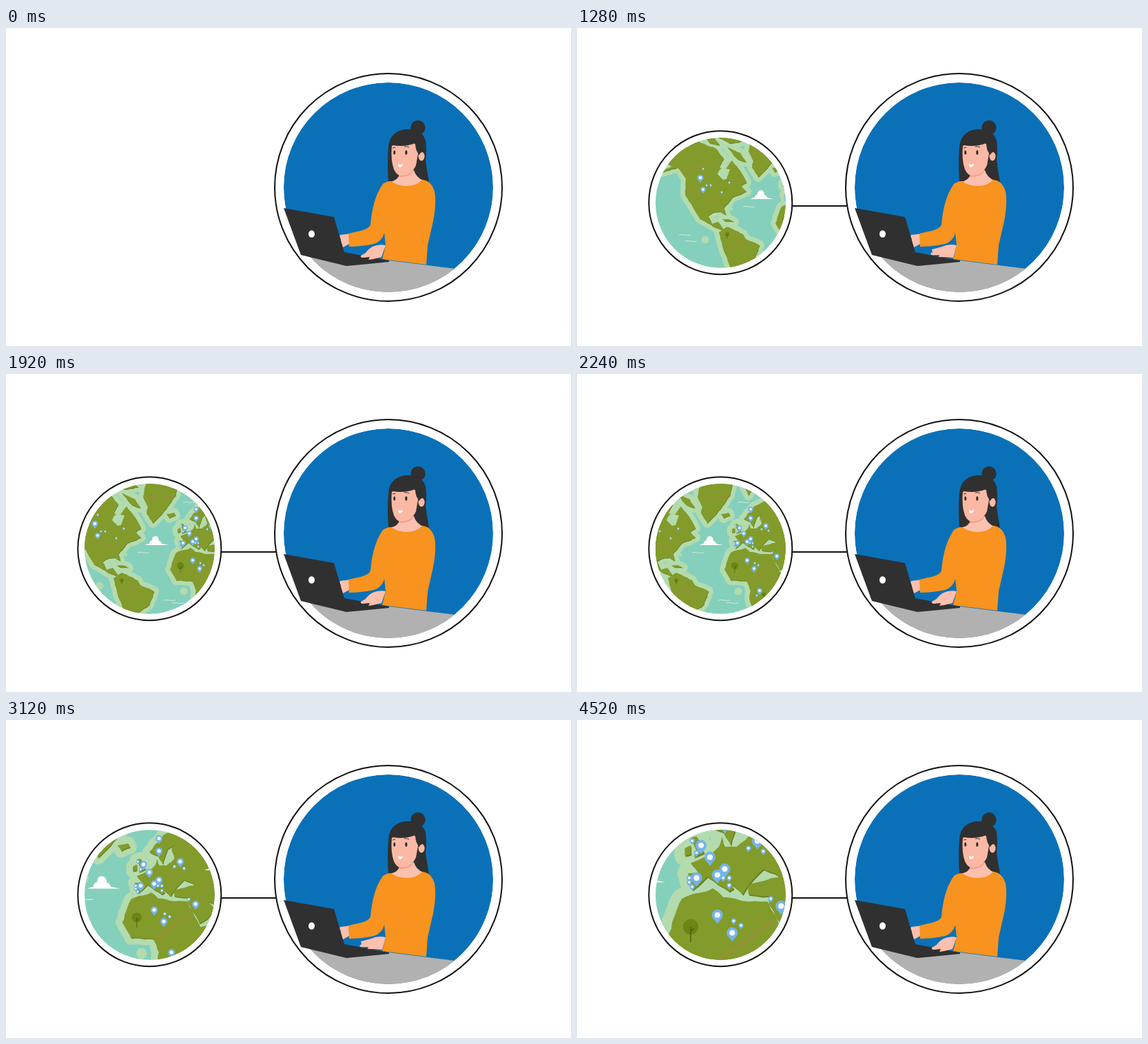
Recreate the animation shown at these times as an HTML page. Size 820 by 461 pixels, loop 5000 ms.

```html
<!DOCTYPE html>
<html lang="en">
<head>
<meta charset="utf-8">
<title>World map and laptop</title>
<style>
  html, body { margin: 0; width: 100%; height: 100%; overflow: hidden; background: #fff; }
  svg { display: block; width: 100vw; height: 100vh; }
</style>
</head>
<body>
<svg viewBox="0 0 820 461" preserveAspectRatio="none">
  <defs>
    <clipPath id="globeClip"><circle cx="208.3" cy="253.5" r="94.3"/></clipPath>
    <clipPath id="roomClip"><circle cx="555" cy="231" r="152"/></clipPath>
    <g id="land" stroke-linejoin="round">
      <!-- North America -->
      <path d="M67 210L88 201 76 193 90 178 122 163 152 175 163 189 156 202 166 204 175 192 190 212 196 224 188 229 196 237 176 245 163 261 166 271 158 266 146 268 140 272 146 284 155 281 164 294 151 289 128 276 107 242 108 218 96 202Z"/>
      <path d="M138 160L149 159 157 170 143 167Z"/>
      <path d="M168 172L187 181 195 194 183 190Z"/>
      <path d="M153 157L185 158 192 164 171 167Z"/>
      <path d="M161 277L169 277 178 281 165 280Z"/>
      <!-- South America -->
      <path d="M156 296L168 288 191 299 195 306 215 315 208 334 185 352 171 364 172 345 162 320Z"/>
      <!-- Greenland, Iceland, Svalbard -->
      <path d="M205 148L252 148 246 176 226 203 213 216 204 202 206 193 199 178Z"/>
      <path d="M233 203L244 201 246 205 237 209Z"/>
      <path d="M267 164L280 164 273 176Z"/>
      <!-- Africa -->
      <path d="M238 283L247 259 268 252 275 258 292 261 305 261 319 288 330 286 315 310 308 333 294 352 283 352 274 324 276 314 270 300 247 299Z"/>
      <!-- British Isles -->
      <path d="M253 218L257 217 262 228 255 231 257 227Z"/>
      <path d="M249 225L253 223 253 229 249 230Z"/>
      <!-- Europe and Asia -->
      <path d="M251 242L258 241 253 235 264 230 272 224 274 217 276 224 284 224 292 217 289 207 294 202 285 207 280 223 275 214 266 210 281 192 297 184 311 197 332 182 370 170 370 240 313 244 302 239 295 246 288 256 276 245 282 252 279 254 264 244 254 253Z"/>
      <path d="M370 230L298 248 292 250 292 256 306 257 306 263 318 284 337 271 322 259 340 268 370 280Z"/>
    </g>
    <g id="pin">
      <path d="M-.94 .35L0 1.6 .94 .35Z"/><circle r="1"/>
      <circle r=".5" fill="#fff"/>
    </g>
    <path id="cloud" fill="#fff" d="M202 248Q205 246 208 246 208 242 212 241 212 235 217 235 222 236 222 242 225 242 226 246L236 248Z"/>
  </defs>

  <g id="bubble">
    <path d="M312 258H392" stroke="#111" stroke-width="2"/>
    <circle cx="208.3" cy="253.2" r="104" fill="#fff" stroke="#111" stroke-width="2"/>
    <g clip-path="url(#globeClip)">
      <rect x="110" y="155" width="198" height="198" fill="#84d0bc"/>
      <g id="map">
        <g fill="#b3dbae">
          <use href="#land" stroke="#b3dbae" stroke-width="14"/>
          <path d="M247 256L262 248 290 246 310 256 300 264Z"/>
          <circle cx="136" cy="307" r="5.500"/><circle cx="258" cy="315" r="5.500"/>
          <circle cx="174" cy="262" r="2.300"/>
        </g>
        <use href="#land" fill="#6c8322" transform="translate(.6 1)"/>
        <use href="#land" fill="#839b2a"/>
        <path fill="#b3dbae" d="M156 207L160 203 172 205 167 219 162 220 154 212Z"/>
        <path stroke="#a08b40" stroke-width="1.3" d="M109 233L161 254M114 208L146 190M166 322L191 308M182 309L194 322M204 181L244 177M272 300L309 274M322 248L348 234"/>
        <g id="waves" stroke="#cfead7" fill="none"></g>
        <g id="trees" fill="#6c8515" stroke="#48570f" stroke-width=".6"></g>
        <use href="#cloud"/>
        <use href="#cloud" transform="translate(190 65.3) scale(.66)"/>
        <g id="pins" fill="#74b5ea"></g>
      </g>
    </g>
  </g>

  <circle cx="555" cy="231" r="165" fill="#fff" stroke="#111" stroke-width="2"/>
  <g clip-path="url(#roomClip)">
    <circle cx="555" cy="231" r="152" fill="#0a71b9"/>
    <path fill="#b1b1b1" d="M425 331L491 326 556 337 652 349V390H425Z"/>
  </g>
  <!-- hair, neck, face -->
  <g fill="#303030">
    <circle cx="598" cy="144.5" r="10.6"/>
    <path d="M555 222Q553 198 555 172 557 150 580 147 603 145 609 163 611 178 609 192 611 208 614 223L568 222Z"/>
  </g>
  <path fill="#fbc0ae" d="M557 223Q569 221 571 212L592 206Q595 217 606 221 598 230 581 231 566 231 557 223Z"/>
  <path fill="#f49a86" d="M570 213Q583 215 592 206 588 216 570 216Z"/>
  <path fill="#fbb9a5" d="M560 169Q558 192 563 205 567 214 574 214 589 213 595 199L599 176 590 163Z"/>
  <ellipse cx="603" cy="186" rx="4.5" ry="6.5" fill="#fbb9a5"/>
  <g fill="#303030">
    <path d="M556 173Q557 150 580 147 603 147 609 165L607 180Q602 179 600 184 594 178 594 167 578 173 562 170Z"/>
    <ellipse cx="563.7" cy="180.5" rx="1.5" ry="3"/><ellipse cx="580.8" cy="180.5" rx="1.6" ry="3.2"/>
  </g>
  <path d="M561 174l4-1M578 172q4-1 7 1" fill="none" stroke="#303030"/>
  <path fill="#fff" d="M569 197Q573 199 576 197 575 202 571 202 569 201 569 197Z"/>
  <!-- far hand, sweater -->
  <path id="leftHand" fill="#fbc0ae" d="M501 298L485 300Q483 303 486 306L485 315 489 318 502 311Z"/>
  <path fill="#f7931e" d="M547 226Q553 222 559 222 568 229 581 229 596 229 604 220 617 221 622 237 625 254 620 280L612 315 610 343 546 335 551 315 549 297Q546 309 534 313 518 317 498 317L497 298 515 294Q527 291 529 285 532 247 547 226Z"/>
  <!-- laptop -->
  <path fill="#303030" d="M403 261L476 274 491 325 556 337V339L494 345 428 329Z"/>
  <ellipse cx="443.5" cy="298.5" rx="4.5" ry="5.3" fill="#fff"/>
  <path id="rightHand" fill="#fbc0ae"/>
</svg>
<script>
const $ = id => document.getElementById(id);
const LOOP = 5000, STEP = 40;

// Camera centre over the map: [time, x]
const track = [[560, 144], [1280, 158], [1920, 208], [2560, 252], [3120, 266], [3900, 273]];
const TYPING = [0, 2840], TYPING_MS = 1680;
const HAND_DOWN = "M551 315Q541 313 532 317 525 321 522 326L515 330Q514 333 518 333L528 332 526 336 533 335 545 332Z";
const HAND_UP = "M551 315Q540 312 530 317L515 321 516 325 513 327Q514 330 519 329L526 329 525 332 535 332 546 333Z";

// Pin centres by size
const bigPins = [[129, 217], [133, 234], [260, 223], [266, 231], [257, 245], [271, 243], [276, 239], [271, 270],
  [281, 282], [314, 264], [298, 220], [276, 196], [276, 209], [289, 314]];
const smallPins = [[133, 204], [138, 228], [144, 228], [171, 224], [160, 238], [254, 220], [257, 228], [252, 245],
  [252, 248], [254, 251], [275, 245], [279, 245], [279, 250], [292, 225], [302, 227], [307, 259], [282, 274],
  [287, 277], [285, 321]];

// Break straight coasts into small bays and capes
let seed = 7;
const random = () => (seed = seed * 16807 % 2147483647) / 2147483647;
function roughen(path) {
  const n = path.getAttribute("d").match(/\d+/g).map(Number);
  let d = "";
  for (let i = 0; i < n.length; i += 2) {
    const [x, y] = [n[i], n[i + 1]];
    const dx = n[(i + 2) % n.length] - x, dy = n[(i + 3) % n.length] - y;
    const parts = Math.ceil(Math.hypot(dx, dy) / 5);
    for (let k = 0; k < parts; k++) {
      const u = k / parts, off = k ? (random() - .5) * .3 : 0;
      d += `${d ? "L" : "M"}${x + dx * u - dy / parts * off} ${y + dy * u + dx / parts * off}`;
    }
  }
  path.setAttribute("d", d + "Z");
}
document.querySelectorAll("#land path").forEach(roughen);

const wave = (x, y) => `<path d="M${x} ${y}q4-1 8 0t9 0"/>`;
const tree = (x, y, r) => `<circle cx="${x}" cy="${y}" r="${r}" stroke="none"/>
  <path d="M${x} ${y}v${2 * r}m0 ${-1.4 * r}l${r * .4} ${-r * .4}"/>`;
$("waves").innerHTML = wave(98, 300) + wave(107, 309) + wave(191, 259) + wave(229, 328) + wave(241, 332) + wave(257, 186);
$("trees").innerHTML = tree(253, 278, 5.2) + tree(168, 299, 3) + tree(295, 319, 3);

function addPin(x, y, r) {
  const pin = document.createElementNS("http://www.w3.org/2000/svg", "use");
  pin.setAttribute("href", "#pin");
  $("pins").append(pin);
  const size = k => pin.setAttribute("transform", `translate(${x} ${y}) scale(${r * k})`);
  size(1);
  return size;
}
bigPins.forEach(([x, y]) => addPin(x, y, x < 130 ? 4.6 : 3.7));
smallPins.forEach(([x, y]) => addPin(x, y, 1.7));
const fadingPins = [addPin(142, 218, 4.6), addPin(137, 226, 2.8), addPin(145, 225, 2.8)];

const clamp = u => Math.max(0, Math.min(1, u));
const cubicInOut = u => u < .5 ? 4 * u ** 3 : 1 - 4 * (1 - u) ** 3;
const backOut = (u, c = 2.42) => 1 + (c + 1) * (u - 1) ** 3 + c * (u - 1) ** 2;

// Smooth curve through the camera points, at rest at both ends
function follow(keys, t) {
  const last = keys.length - 1;
  if (t <= keys[0][0]) return keys[0][1];
  if (t >= keys[last][0]) return keys[last][1];
  const slope = i => i < 1 || i >= last ? 0
    : (keys[i + 1][1] - keys[i - 1][1]) / (keys[i + 1][0] - keys[i - 1][0]);
  const i = keys.findIndex(k => k[0] > t) - 1;
  const [t0, a] = keys[i], [t1, b] = keys[i + 1];
  const d = t1 - t0, u = (t - t0) / d, v = 1 - u;
  return a * v * v * (1 + 2 * u) + b * u * u * (3 - 2 * u)
    + d * u * v * (slope(i) * v - slope(i + 1) * u);
}

function draw(t) {
  const pop = backOut(clamp(t / 520));
  $("bubble").setAttribute("transform", `translate(390 258) scale(${pop}) translate(-390 -258)`);

  const zoom = cubicInOut(clamp((t - 2500) / 1400));
  const x = follow(track, t), y = 253 + 3.2 * zoom;
  $("map").setAttribute("transform", `translate(208 253) scale(${1 + 1.15 * zoom}) translate(${-x} ${-y})`);
  for (const size of fadingPins) size(1 - clamp((t - 700) / 400));

  const start = TYPING.find(s => t >= s && t < s + TYPING_MS);
  const beat = start === undefined ? 0 : (t - start) % 240;
  $("rightHand").setAttribute("d", beat >= 40 && beat < 160 ? HAND_UP : HAND_DOWN);
  $("leftHand").setAttribute("transform", beat >= 160 ? "translate(-1 -2)" : "");
}

let origin;
function tick(now) {
  origin ??= now;
  draw(Math.floor((now - origin) % LOOP / STEP) * STEP);
  requestAnimationFrame(tick);
}
draw(0);
requestAnimationFrame(tick);
</script>
</body>
</html>
```
